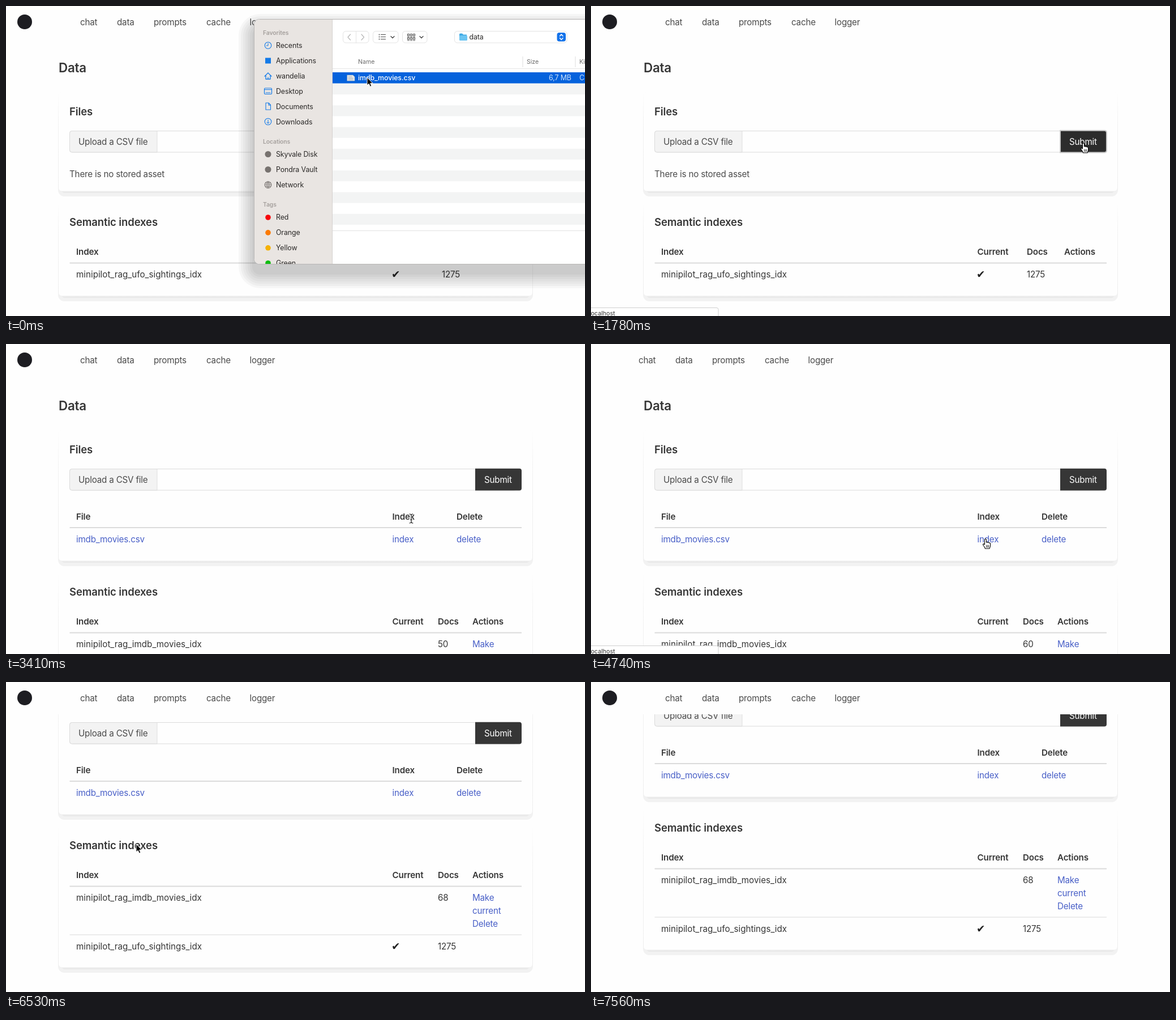
Recreate the animation shown at these times as an HTML page. Size 1023 by 547 pixels, loop 8000 ms.

```html
<!DOCTYPE html>
<html lang="en">
<head>
<meta charset="utf-8">
<title>Data page</title>
<style>
html, body { margin: 0; width: 100%; height: 100%; overflow: hidden; background: #fefefe; }
svg { display: block; width: 100%; height: 100%; }
text { font-family: Inter, "Noto Sans", sans-serif; font-size: 15.2px; letter-spacing: -.2px; fill: #4a4a4a; white-space: pre; }
.h1 { font-size: 22.3px; font-weight: 600; fill: #363636; }
.h2 { font-size: 18.5px; font-weight: 600; letter-spacing: -.12px; fill: #363636; }
.th { font-size: 15.2px; font-weight: 600; letter-spacing: -.15px; fill: #363636; }
.name { letter-spacing: 0; fill: #363636; }
.cell { fill: #363636; }
.link { fill: #485fc7; }
.inv { fill: #fff; }
.tick { font-family: "DejaVu Sans", sans-serif; font-size: 18.5px; fill: #222; }
.side { font-size: 12.4px; letter-spacing: -.1px; fill: #2b2928; }
.group { font-size: 10.4px; font-weight: 600; letter-spacing: -.1px; fill: #a5a09d; }
.col { font-size: 10.6px; letter-spacing: 0; fill: #6b6b6b; }
.tiny { font-size: 10.6px; letter-spacing: 0; fill: #333; }
.picked { font-weight: 500; fill: #fff; }
.pale { fill: #cfe0fa; }
</style>
</head>
<body>
<svg id="stage" viewBox="0 0 1023 547" preserveAspectRatio="none"></svg>
<script>
const LOOP = 8000, TICK = 148.15;

const rect = (x, y, w, h, fill, more = '') =>
  `<rect x="${x}" y="${y}" width="${w}" height="${h}" fill="${fill}" ${more}/>`;
const path = (d, stroke, w = 1, fill = 'none') =>
  `<path d="${d}" fill="${fill}" stroke="${stroke}" stroke-width="${w}" stroke-linecap="round" stroke-linejoin="round"/>`;
const dot = (x, y, r, fill, stroke = 'none') =>
  `<circle cx="${x}" cy="${y}" r="${r}" fill="${fill}" stroke="${stroke}" stroke-width="1.1"/>`;
// y is the middle of the line of text
const text = (x, y, s, cls = '', drop = 5, more = '') =>
  `<text x="${x}" y="${y + drop}" class="${cls}" ${more}>${s}</text>`;
const group = (id, body) => `<g id="${id}">${body}</g>`;

function card(top, bottom) {
  return rect(92, bottom - 24, 839, 33, '#f2f2f2', 'rx="11"') +
    rect(97, bottom - 12, 829, 15, '#e9e9e9', 'rx="7"') +
    rect(92.5, top, 838, bottom - top, '#fefefe', 'rx="6" stroke="url(#edge)"');
}

const rule = (y, h = 2) => rect(112.5, y, 798.5, h, '#dbdbdb');

function form() {
  return text(93, 109, 'Data', 'h1', 8.3) + text(112, 187, 'Files', 'h2', 6.2) +
    rect(112.5, 220.5, 790, 37.5, '#fefefe', 'rx="4" stroke="#dbdbdb"') +
    path('M266.5 220.5H116.5Q112.5 220.5 112.5 224.5V254Q112.5 258 116.5 258H266.5Z', '#dbdbdb', 1, '#f3f3f3') +
    text(128, 239.5, 'Upload a CSV file') +
    '<path class="submit" d="M829 219.7H907Q911 219.7 911 223.7V254.4Q911 258.4 907 258.4H829Z" fill="#363636"/>' +
    text(845, 239.5, 'Submit', 'inv');
}

function indexHead(y, docs, actions) {
  return text(112, y, 'Semantic indexes', 'h2', 6.5) + text(124, y + 53, 'Index', 'th') +
    text(682.5, y + 53, 'Current', 'th') + text(docs, y + 53, 'Docs', 'th') +
    text(actions, y + 53, 'Actions', 'th') + rule(y + 71.5);
}

function ufoRow(y, docs) {
  return text(124, y, 'minipilot_rag_ufo_sightings_idx', 'name') +
    text(681, y, '✔', 'tick', 6.3) + text(docs, y, '1275', 'cell');
}

const emptyPage = () =>
  card(152, 327) + form() + text(112, 297, 'There is no stored asset') +
  card(347, 512) + indexHead(381, 770, 836) + ufoRow(474, 770);

const filledPage = () =>
  card(152, 383) + form() +
  text(124, 305, 'File', 'th') + text(682.5, 305, 'Index', 'th') + text(796, 305, 'Delete', 'th') + rule(323) +
  text(124, 345, 'imdb_movies.csv', 'link') + text(682.5, 345, 'index', 'link') + text(796, 345, 'delete', 'link') +
  card(403, 653) + indexHead(437, 763, 824) +
  text(124, 530, 'minipilot_rag_imdb_movies_idx', 'name') + text(763, 530, '50', 'cell', 5, 'id="docs"') +
  ['Make', 'current', 'Delete'].map((s, i) => text(824, 530 + 23 * i, s, 'link')).join('') +
  rule(594.5, 1) + ufoRow(615.5, 763);

function navBar() {
  const items = [[131, 'chat'], [196, 'data'], [261, 'prompts'], [354, 'cache'], [430.5, 'logger']];
  return rect(0, 0, 1023, 57, '#fefefe') + group('logo', dot(33, 28, 13, '#1d1d22')) +
    group('menu', items.map(([x, s]) => text(x, 29, s)).join(''));
}

function sidebar() {
  const blue = '#147be8', grey = '#77726f';
  const icons = {
    Recents: dot(463, 69.5, 5.8, 'none', blue) + path('M463 66V70H460', blue),
    Applications: rect(458, 91.5, 10, 10, blue),
    wandelia: path('M457 124L463 118 469 124M459 123V129H467V123M463 129V126', blue, 1.3),
    Desktop: rect(456.5, 145, 13, 10.5, 'none', `rx="1.5" stroke="${blue}" stroke-width="1.2"`) +
      path('M457 147.5H469M459 153H467', blue, 1.2),
    Documents: path('M459 171H464L467.5 174.5V183H459ZM464 171V175H467', blue, 1.1),
    Downloads: dot(463, 204, 5.8, 'none', blue) + path('M463 201V207M460.7 205L463 207.3 465.3 205', blue),
    'Skyvale Disk': dot(463, 261.5, 5.5, grey),
    'Pondra Vault': dot(463, 288.5, 5.5, grey),
    Network: dot(463, 315.5, 5.8, 'none', grey) +
      path('M457.5 315.5H468.5M463 310V321M458.5 312.5H467.5M458.5 318.5H467.5M463 310Q457.5 315.5 463 321Q468.5 315.5 463 310', grey, .8)
  };
  const places = Object.keys(icons).map((s, i) => {
    const y = i < 6 ? 70 + 26.9 * i : 261.5 + 26.9 * (i - 6);
    return icons[s] + text(477, y, s, 'side', 4.4);
  }).join('');
  const tags = [['Red', '#f7060b'], ['Orange', '#fb7a02'], ['Yellow', '#f5b104'], ['Green', '#0fbd10']]
    .map(([s, c], i) => dot(463, 373 + 26.9 * i, 4.8, c) + text(477, 373 + 26.9 * i, s, 'side', 4.4)).join('');
  return rect(439, 24, 137.5, 431, '#e9e5e2') +
    text(454, 47.5, 'Favorites', 'group', 3.6) + text(454, 239.5, 'Locations', 'group', 3.6) +
    text(454, 350.5, 'Tags', 'group', 3.6) + places + tags + rect(576, 24, 1, 431, '#d6d2d0');
}

function toolbar() {
  const box = (x, w) => rect(x, 44.5, w, 20.5, '#fff', 'rx="5" stroke="#e3e3e3"');
  const ink = '#4b4b4b';
  let s = box(595.5, 45.5) + path('M618.5 45V65', '#e3e3e3') +
    path('M608.5 50L604 55 608.5 60M628 50L632.5 55 628 60', '#b5b5b5', 1.2) +
    box(648.5, 44.5) + box(700.5, 43.5) +
    path('M680 53.5L683 56.5 686 53.5M731 53.5L734 56.5 737 53.5', ink, 1.4) +
    box(792.5, 198.5) + path('M801 50Q801 48.5 802.5 48.5H806L808 50.5H814V60H801Z', 'none', 0, '#3fa9e4') +
    rect(801, 52, 14, 9, '#6cc5f2', 'rx="1.5"') + text(818.5, 55, 'data', 'side', 4.4) +
    rect(973.5, 47, 15.5, 15.5, '#1473ea', 'rx="4"') +
    path('M978.5 53L981.2 50 984 53M978.5 56.5L981.2 59.5 984 56.5', '#fff', 1.4);
  for (let i = 0; i < 3; i++) {
    s += dot(659.5, 50.5 + 4 * i, .9, ink) + path(`M662.5 ${50.5 + 4 * i}h8`, ink, 1.2);
    for (let j = 0; j < 2; j++)
      s += rect(709.5 + 5 * i, 49.5 + 6.5 * j, 3, 3, 'none', `stroke="${ink}"`) +
        rect(709 + 5 * i, 54 + 6.5 * j, 4, .8, ink);
  }
  return s;
}

function fileList() {
  let s = '';
  for (let i = 0; i < 7; i++) s += rect(577, 137 + 38.3 * i, 446, 19.1, '#f3f4f4');
  return s + text(622, 98, 'Name', 'col', 4) + text(920, 98, 'Size', 'col', 4) + text(1013, 98, 'Kind', 'col', 4) +
    rect(577, 110, 446, 1, '#e5e5e5') + rect(912.5, 89, 1, 19, '#dedede') + rect(1005.5, 89, 1, 19, '#dedede') +
    rect(577, 117, 446, 19.5, '#0562dc') +
    path('M603 122H613L616 125V132H603Z', '#b9bdc2', .6, '#e3e6e8') + path('M605 125H611M605 127.5H613M605 130H613', '#9ba1a8', .8) +
    text(622, 127, 'imdb_movies.csv', 'side picked', 4.4) +
    text(959, 127, '6,7 MB', 'side pale', 4.4) + text(1013, 127, 'CSV', 'side pale', 4.4) +
    rect(577, 396, 446, 1, '#e2e2e2');
}

// soft shadow in even steps, set lower than the window
function shadow() {
  let s = '';
  for (let d = 28; d > 0; d -= 4)
    s += rect(439 - d, 42 - d, 700, 428 + 2 * d, '#1a0e08', `rx="${10 + d}" opacity=".03"`);
  return s;
}

const dialog = () =>
  shadow() + rect(438.5, 23.5, 700, 432, '#fff', 'rx="9" stroke="#b9b7b6"') +
  `<g clip-path="url(#frame)">${sidebar()}${toolbar()}${fileList()}</g>`;

const statusBar = () =>
  path('M-2 532.5H222Q225 532.5 225 535.5V549H-2Z', '#cfcfcf', 1, '#fff') + text(-2.8, 542, 'localhost', 'tiny', 3.6);

// each pointer has its tip (or middle, for the text bar) at 0,0
const pointers = {
  arrow: '<path d="M0 0V14L3.2 11.2 5.4 16.2 7.8 15.2 5.7 10.3H10Z" fill="#000" stroke="#fff" stroke-width="1"/>',
  hand: path('M-1.5 1Q0 -1 1.5 1V6Q3 4.8 4 6.4Q5.6 5.4 6.4 7Q8.6 6.4 8.6 8.6V11.5Q8.6 14 7 17H-.5Q-1.5 14-4 11Q-5 9-3.4 8.6Q-2.4 8.6-1.5 10Z', '#000', 1.1, '#fff') +
    path('M1.6 11V15M3.6 11V15M5.6 11V15', '#000', .8),
  bar: ['#fff', '#222'].map((c, i) => path('M-3-8Q0-8 0-5.5Q0-8 3-8M0-6V6M-3 8Q0 8 0 5.5Q0 8 3 8M-1.5 2H1.5', c, i ? 1.2 : 2.6)).join('')
};

const stage = document.getElementById('stage');
stage.innerHTML =
  `<defs><linearGradient id="edge" x1="0" y1="0" x2="0" y2="1">
  <stop offset="0" stop-color="#fefefe"/><stop offset=".25" stop-color="#f3f3f3"/><stop offset="1" stop-color="#eeeeee"/></linearGradient>
  <clipPath id="frame"><rect x="439" y="24" width="699" height="431" rx="9"/></clipPath></defs>` +
  rect(0, 0, 1023, 547, '#fefefe') + group('empty', emptyPage()) + group('filled', filledPage()) + navBar() +
  group('status', statusBar()) + group('dialog', dialog()) +
  group('pointer', Object.keys(pointers).map(k => group(k, pointers[k])).join(''));

const el = id => document.getElementById(id);
const show = (id, on) => el(id).setAttribute('display', on ? 'inline' : 'none');
const move = (id, x, y) => el(id).setAttribute('transform', `translate(${x} ${y})`);

// pointer strokes: first tick, last tick, bend, end
const strokes = [
  [7, 12, 770, 170, 870, 242],
  [15, 20, -190, -45, 300, 235],
  [22, 23, 510, 270, 716, 308],
  [24, 28, 708, 325, 697, 344],
  [39, 41, 450, 290, 230, 286],
  [45, 50, 190, 110, 134, 8]
];

function pointerAt(n) {
  let x = 638, y = 126;
  for (const [a, b, cx, cy, ex, ey] of strokes) {
    if (n < a) break;
    const k = Math.min(1, (n - a + 1) / (b - a + 1)), u = k * k * (3 - 2 * k), v = 1 - u;
    x = v * v * x + 2 * u * v * cx + u * u * ex;
    y = v * v * y + 2 * u * v * cy + u * u * ey;
  }
  return [x, y];
}

const within = (n, a, b) => n >= a && n <= b;

function draw(ms) {
  const n = Math.floor((ms % LOOP + 8) / TICK);
  show('dialog', n < 2);
  show('empty', n < 13);
  show('filled', n >= 13);
  show('status', within(n, 11, 12) || within(n, 27, 38));

  const button = el('empty').querySelector('.submit'), focus = within(n, 11, 12);
  button.setAttribute('fill', focus ? '#2c2c2c' : '#363636');
  button.setAttribute('stroke', focus ? '#c9c9c9' : 'none');
  button.setAttribute('stroke-width', 2);

  const logo = ![32, 35, 38].includes(n);
  show('logo', logo);
  move('menu', logo ? 0 : -47, 0);
  el('docs').textContent = n < 32 ? 50 : n < 34 ? 60 : n < 35 ? 62 : n < 38 ? 64 : 68;
  move('filled', 0, n < 43 ? 0 : -Math.round(180 * (1 - Math.pow(.415, n - 42))));

  const kind = within(n, 11, 14) || within(n, 26, 38) ? 'hand' : within(n, 23, 25) ? 'bar' : 'arrow';
  for (const k in pointers) show(k, k === kind);
  show('pointer', n < 51);
  move('pointer', ...pointerAt(n));
}

const start = performance.now();
function loop() {
  draw(performance.now() - start);
  requestAnimationFrame(loop);
}
draw(0);
requestAnimationFrame(loop);
</script>
</body>
</html>
```
